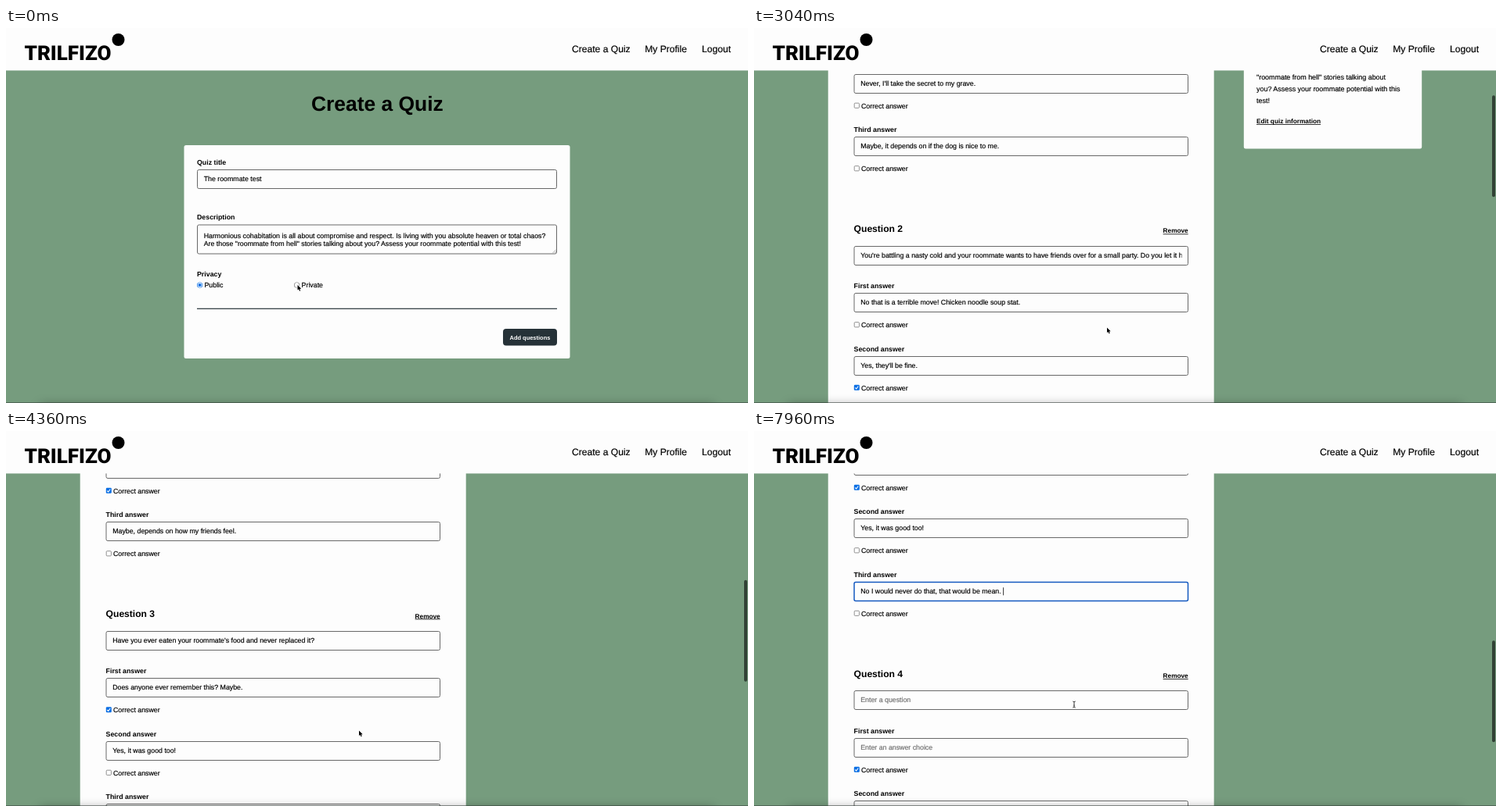
Animation of 948 by 480 pixels, one loop 8000 ms. Source, as an HTML page with a canvas:

```html
<!DOCTYPE html>
<html lang="en">
<head>
<meta charset="utf-8">
<title>Quiz editor</title>
<style>
html, body { margin: 0; width: 100%; height: 100%; overflow: hidden; background: #769c7e; }
canvas { display: block; width: 948px; height: 480px; }
</style>
</head>
<body>
<canvas id="stage"></canvas>
<script>
const W = 948, H = 480, LOOP = 8000, STEP = 40;
const SANS = '"Liberation Sans", Arial, sans-serif';
const GREEN = '#769c7e', PAPER = '#fdfdfd', INK = '#000', BLUE = '#0b6fe4', SLATE = '#263238', EDGE = '#686868';
const PAGE_SWITCH = 1440, FOCUS = 5840, FILL = 6720, BLINK = 520;
const BLOCK = 361, ROW = 80.5;

const canvas = document.getElementById('stage');
const ctx = canvas.getContext('2d');
const dpr = window.devicePixelRatio || 1;
canvas.width = W * dpr;
canvas.height = H * dpr;

const CHOICE = 'Enter an answer choice';
const questions = [
  { ask: "Your pet has just peed all over your roommate's pillow. You clean up the mess and there is no sign that it happened.",
    answers: ['Of course! I will replace the pillow as well.', "Never, I'll take the secret to my grave.", 'Maybe, it depends on if the dog is nice to me.'], correct: 0 },
  { ask: "You're battling a nasty cold and your roommate wants to have friends over for a small party. Do you let it happen?",
    answers: ['No that is a terrible move! Chicken noodle soup stat.', "Yes, they'll be fine.", 'Maybe, depends on how my friends feel.'], correct: 1 },
  { ask: "Have you ever eaten your roommate's food and never replaced it?",
    answers: ['Does anyone ever remember this? Maybe.', 'Yes, it was good too!', 'No I would never do that, that would be mean. '], correct: 0 },
  { ask: '', answers: ['', '', ''], correct: 0 }
];
const ordinals = ['First', 'Second', 'Third'];
const blurb = ['Harmonious cohabitation is all about', 'compromise and respect. Is living with you',
  'absolute heaven or total chaos? Are those', '"roommate from hell" stories talking about',
  'you? Assess your roommate potential with this', 'test!'];

// [time, scroll offset]
const scrollKeys = [[2280, 0], [2720, 82.5], [3015, 299], [3200, 395.5], [3400, 424.5], [3720, 435],
  [3920, 435], [4080, 490], [4360, 698.5], [4520, 789], [4720, 824], [5000, 835], [5080, 837],
  [7560, 837], [7760, 875], [7960, 983], [8000, 1016]];
// [start, end, x, y]
const cursorMoves = [[600, 1360, 668, 396], [1440, 2240, 451, 383.5], [5280, 5800, 409, 350]];

const clamp = v => Math.min(1, Math.max(0, v));
const smooth = v => { v = clamp(v); return v * v * (3 - 2 * v); };

// Monotone cubic through the keys
function follow(keys, t) {
  const last = keys.length - 1;
  if (t <= keys[0][0]) return keys[0][1];
  if (t >= keys[last][0]) return keys[last][1];
  const slope = i => (keys[i + 1][1] - keys[i][1]) / (keys[i + 1][0] - keys[i][0]);
  const tangent = i => {
    if (i === 0) return 0;
    if (i === last) return slope(i - 1);
    const a = slope(i - 1), b = slope(i);
    return a * b > 0 ? 2 * a * b / (a + b) : 0;
  };
  let i = 0;
  while (t >= keys[i + 1][0]) i++;
  const [t0, v0] = keys[i], [t1, v1] = keys[i + 1];
  const d = t1 - t0, u = (t - t0) / d, w = 1 - u;
  return v0 * (1 + 2 * u) * w * w + v1 * u * u * (3 - 2 * u)
    + d * (tangent(i) * u * w * w - tangent(i + 1) * u * u * w);
}

function cursorAt(t) {
  let x = 372.5, y = 329;
  for (const [a, b, tx, ty] of cursorMoves) {
    const k = smooth((t - a) / (b - a));
    x += (tx - x) * k;
    y += (ty - y) * k;
  }
  return { x, y };
}

// Regular text gets a hairline stroke for slightly heavier strokes
function text(str, x, y, size = 8.8, weight = 400, color = INK, family = SANS) {
  ctx.font = `${weight} ${size}px ${family}`;
  ctx.fillStyle = color;
  ctx.fillText(str, x, y);
  if (weight === 400) {
    ctx.strokeStyle = color;
    ctx.lineWidth = 0.18;
    ctx.strokeText(str, x, y);
  }
  return ctx.measureText(str).width;
}

function link(str, x, y) {
  const w = text(str, x, y, 8.25, 700);
  ctx.fillRect(x, y + 1, w, 0.8);
}

function box(x, y, w, h, r, fill, stroke, line = 1) {
  ctx.beginPath();
  ctx.roundRect(x, y, w, h, r);
  if (fill) { ctx.fillStyle = fill; ctx.fill(); }
  if (stroke) { ctx.strokeStyle = stroke; ctx.lineWidth = line; ctx.stroke(); }
}

function disc(x, y, r, fill) {
  ctx.beginPath();
  ctx.arc(x, y, r, 0, Math.PI * 2);
  ctx.fillStyle = fill;
  ctx.fill();
}

function ellipse(x, y, rx, ry, angle, fill) {
  ctx.beginPath();
  ctx.ellipse(x, y, rx, ry, angle, 0, Math.PI * 2);
  ctx.fillStyle = fill;
  ctx.fill();
}

function polyline(points, color, width) {
  ctx.beginPath();
  points.forEach(([x, y]) => ctx.lineTo(x, y));
  ctx.strokeStyle = color;
  ctx.lineWidth = width;
  ctx.stroke();
}

function arcLine(x, y, r, from, to) {
  ctx.beginPath();
  ctx.arc(x, y, r, from, to);
  ctx.stroke();
}

function field(x, y, w, value, hint, focused) {
  y = Math.round(y);
  box(x + 0.5, y + 0.5, w - 1, 24, 2, PAPER, focused ? '#1459c0' : EDGE, focused ? 1.5 : 1);
  ctx.save();
  ctx.beginPath();
  ctx.rect(x + 8.5, y, w - 17, 25);
  ctx.clip();
  text(value || hint, x + 8.7, y + 15.3, 8.8, 400, value ? INK : '#6e6e6e');
  ctx.restore();
}

function radio(x, y, on, pressed) {
  disc(x, y, 3.6, on ? BLUE : '#767676');
  disc(x, y, 2.9, pressed ? '#d0d0d0' : '#fff');
  if (on) disc(x, y, 2.1, BLUE);
}

function checkbox(x, y, on) {
  if (!on) return box(x + 0.4, y - 3.1, 6.2, 6.2, 1, '#fff', '#767676', 0.8);
  box(x, y - 3.5, 7, 7, 1.2, BLUE);
  polyline([[x + 1.5, y + 0.2], [x + 2.9, y + 1.7], [x + 5.4, y - 1.8]], '#fff', 1.1);
}

function star(x, y, r, inner, n, fill) {
  ctx.beginPath();
  for (let i = 0; i < n * 2; i++) {
    const a = i * Math.PI / n - Math.PI / 2, d = i % 2 ? inner : r;
    ctx.lineTo(x + d * Math.cos(a), y + d * Math.sin(a));
  }
  ctx.fillStyle = fill;
  ctx.fill();
}

function illustration(cx, cy) {
  ctx.save();
  ctx.translate(cx, cy);
  ctx.beginPath();
  ctx.arc(0, 0, 51.8, 0, Math.PI * 2);
  ctx.clip();
  ctx.fillStyle = '#fb4f55';
  ctx.fillRect(-52, -52, 104, 104);

  // Swirl above the cup
  ellipse(-30, -32, 15, 13, -0.5, '#fcc15c');
  ellipse(27, -38, 14, 13, 0.4, '#fcc15c');
  ellipse(-13, -38, 14, 16, 0.5, '#2f55ea');
  ellipse(3, -36, 12, 20, 0.3, '#55c5ee');
  ellipse(-8, -28, 8, 7, 0.3, '#55c5ee');
  ellipse(14, -32, 7, 13, -0.3, '#fbe3d4');
  disc(-24, -35, 6, '#fbd9cc');
  disc(23, -36, 5, '#3b54e6');
  disc(30, 8, 5, '#3b54e6');
  disc(-27, 19, 5, '#fbd9cc');

  for (const side of [-1, 1]) {
    polyline([[side * 35, -4], [side * 33, 24]], '#1b1413', 1.2);
    for (let i = -2; i <= 2; i++) {
      const a = -Math.PI / 2 + side * 0.25 + i * 0.45;
      ellipse(side * 35 + 10 * Math.cos(a), -5 + 10 * Math.sin(a), 9, 2, a, '#fde9df');
    }
    ctx.strokeStyle = '#f76be6';
    ctx.lineWidth = 3;
    arcLine(side * 23 - 1, 0, 5, 0, Math.PI * 2);
  }

  // Cup with a sleeping face
  box(-24, -24, 46, 42, [4, 4, 15, 15], '#f76be6');
  ellipse(-1, -24, 22, 3, 0, '#fcc15c');
  ctx.strokeStyle = '#3a1430';
  ctx.lineWidth = 1;
  for (const x of [-12, 10]) {
    for (const y of [-13, -7]) arcLine(x, y, 5, 0.3, Math.PI - 0.3);
  }
  arcLine(-1, 2, 4, 0.3, Math.PI - 0.3);

  // Dark mounds with yellow rims
  for (let i = -3; i <= 3; i++) {
    const x = i * 15, y = 46 - Math.abs(i) * 5, lean = i * 0.1;
    ellipse(x, y, 10, 15, lean, '#fcc15c');
    ellipse(x + 1, y + 4, 9, 15, lean, '#1b1413');
  }
  star(0, 28, 9, 4, 8, '#fcb64a');
  for (const [x, y] of [[-13, -29], [-36, 5], [24, 18], [6, -42]]) star(x, y, 4, 1, 4, '#fff');
  ctx.restore();
}

function heading(scroll) {
  text('Create a Quiz', 390, 106 - scroll, 26.4, 700);
}

function detailsPage(t) {
  heading(0);
  box(227.5, 150, 493, 273, 2.5, PAPER);
  text('Quiz title', 244, 174.7, 8.8, 700);
  field(244, 181, 460, 'The roommate test');
  text('Description', 244, 245.3, 8.8, 700);
  box(244.5, 252, 459, 37, 2, PAPER, EDGE);
  text('Harmonious cohabitation is all about compromise and respect. Is living with you absolute heaven or total chaos?', 252.7, 268.8);
  text('Are those "roommate from hell" stories talking about you? Assess your roommate potential with this test!', 252.7, 278.9);
  polyline([[698.5, 288], [703, 283.5]], '#777', 0.6);
  polyline([[701, 288], [703, 286]], '#777', 0.6);
  text('Privacy', 244, 318, 8.8, 700);
  const secret = t >= 120;
  radio(247.6, 329, !secret, false);
  radio(371.6, 329, secret, t >= 40 && t < 200);
  text('Public', 253.5, 332.4);
  text('Private', 377.6, 332.4);
  ctx.fillStyle = SLATE;
  ctx.fillRect(244, 358.7, 460, 1.2);
  box(635, 385, 69, 21.5, 4, SLATE);
  text('Add questions', 643.5, 398.6, 7.48, 700, '#fff');
}

function questionBlock(q, index, y, t) {
  text('Question ' + (index + 1), 127.6, y + 3.8, 12.1, 700);
  link('Remove', 522.6, y + 5.2);
  field(127.5, y + 21.5, 427.5, q.ask, 'Enter a question');
  q.answers.forEach((answer, i) => {
    const top = y + 72.5 + i * ROW;
    const live = index === 2 && i === 2;
    const value = live && t < FILL ? '' : answer;
    text(ordinals[i] + ' answer', 127.6, top + 3.3, 8.8, 700);
    field(127.5, top + 9.5, 427.5, value, CHOICE, live && t >= FOCUS);
    checkbox(127.8, top + 50, q.correct === i);
    text('Correct answer', 137, top + 53.4);
    if (live) caret(value, top + 22, t);
  });
}

function caret(value, y, t) {
  const since = t - (t >= FILL ? FILL : FOCUS);
  if (since < 0 || Math.floor(since / BLINK) % 2) return;
  ctx.font = `400 8.8px ${SANS}`;
  const x = 136.4 + ctx.measureText(value).width;
  ctx.fillStyle = INK;
  ctx.fillRect(x, y - 5, 0.8, 10);
}

function questionsPage(t, scroll) {
  heading(scroll);
  const top = 150 - scroll;
  box(94.7, top, 493, 1800, 2.5, PAPER);
  questions.forEach((q, i) => {
    const y = top + 60.8 + i * BLOCK;
    if (y < H + 20 && y > -340) questionBlock(q, i, y, t);
  });
  if (top < -280) return;
  box(625.8, top, 227.4, 319, 2.5, PAPER);
  illustration(739.7, top + 82);
  text('The roommate test', 642, top + 159.6, 13.2, 700);
  blurb.forEach((line, i) => text(line, 642, top + 184.2 + i * 15.35, 8.94));
  link('Edit quiz information', 642, top + 286.6);
}

function header() {
  ctx.fillStyle = PAPER;
  ctx.fillRect(0, 0, W, 54.4);
  text('TRILFIZO', 23.5, 40.6, 26, 900, INK, 'Roboto, sans-serif');
  disc(143.5, 15, 8, INK);
  text('Create a Quiz', 723, 31.4, 12.1);
  text('My Profile', 816.2, 31.4, 12.1);
  text('Logout', 889, 31.4, 12.1);
}

function scrollbar(t, scroll) {
  let alpha = 0;
  if (t >= 7560) alpha = 1;
  else if (t >= 2280) alpha = 1 - clamp((t - 5560) / 240);
  if (!alpha) return;
  ctx.globalAlpha = alpha;
  box(943, 0.5 + scroll * 0.2725, 4, 130, 2, 'rgba(0,0,0,.58)');
  ctx.globalAlpha = 1;
}

function bottomShade() {
  ctx.save();
  ctx.shadowColor = 'rgba(0,0,0,.4)';
  ctx.shadowBlur = 14 * dpr;
  ctx.fillStyle = '#000';
  ctx.fillRect(44, 483, W - 88, 20);
  ctx.restore();
  ctx.fillStyle = 'rgba(50,60,55,.55)';
  ctx.fillRect(0, 479, W, 1);
}

function overField(y, scroll) {
  return questions.some((q, i) => {
    const rel = y - (210.8 - scroll + i * BLOCK);
    return [21.5, 82, 82 + ROW, 82 + 2 * ROW].some(top => rel > top && rel < top + 25);
  });
}

function pointer({ x, y }, beam) {
  ctx.save();
  ctx.translate(x, y);
  if (beam) {
    polyline([[-1.8, -4], [0, -3.3], [1.8, -4]], '#222', 0.8);
    polyline([[0, -3.3], [0, 3.3]], '#222', 0.9);
    polyline([[-1.8, 4], [0, 3.3], [1.8, 4]], '#222', 0.8);
    polyline([[-1, 1.2], [1, 1.2]], '#222', 0.6);
  } else {
    ctx.beginPath();
    for (const [px, py] of [[0, 0], [0, 6.6], [1.5, 5.3], [2.5, 7.8], [3.7, 7.3], [2.7, 4.9], [4.7, 4.8]]) ctx.lineTo(px, py);
    ctx.closePath();
    ctx.strokeStyle = '#fff';
    ctx.lineWidth = 1.1;
    ctx.stroke();
    ctx.fillStyle = INK;
    ctx.fill();
  }
  ctx.restore();
}

function draw(t) {
  ctx.setTransform(dpr, 0, 0, dpr, 0, 0);
  ctx.textRendering = 'geometricPrecision';
  ctx.lineJoin = 'round';
  ctx.fillStyle = GREEN;
  ctx.fillRect(0, 0, W, H);
  const scroll = follow(scrollKeys, t);
  const editing = t >= PAGE_SWITCH;
  if (editing) questionsPage(t, scroll);
  else detailsPage(t);
  header();
  scrollbar(t, scroll);
  bottomShade();
  const at = cursorAt(t);
  pointer(at, editing && at.x > 127 && at.x < 555 && overField(at.y, scroll));
}

const start = performance.now();
function tick() {
  const t = (performance.now() - start) % LOOP;
  draw(Math.floor(t / STEP) * STEP);
  requestAnimationFrame(tick);
}
tick();
</script>
</body>
</html>
```
